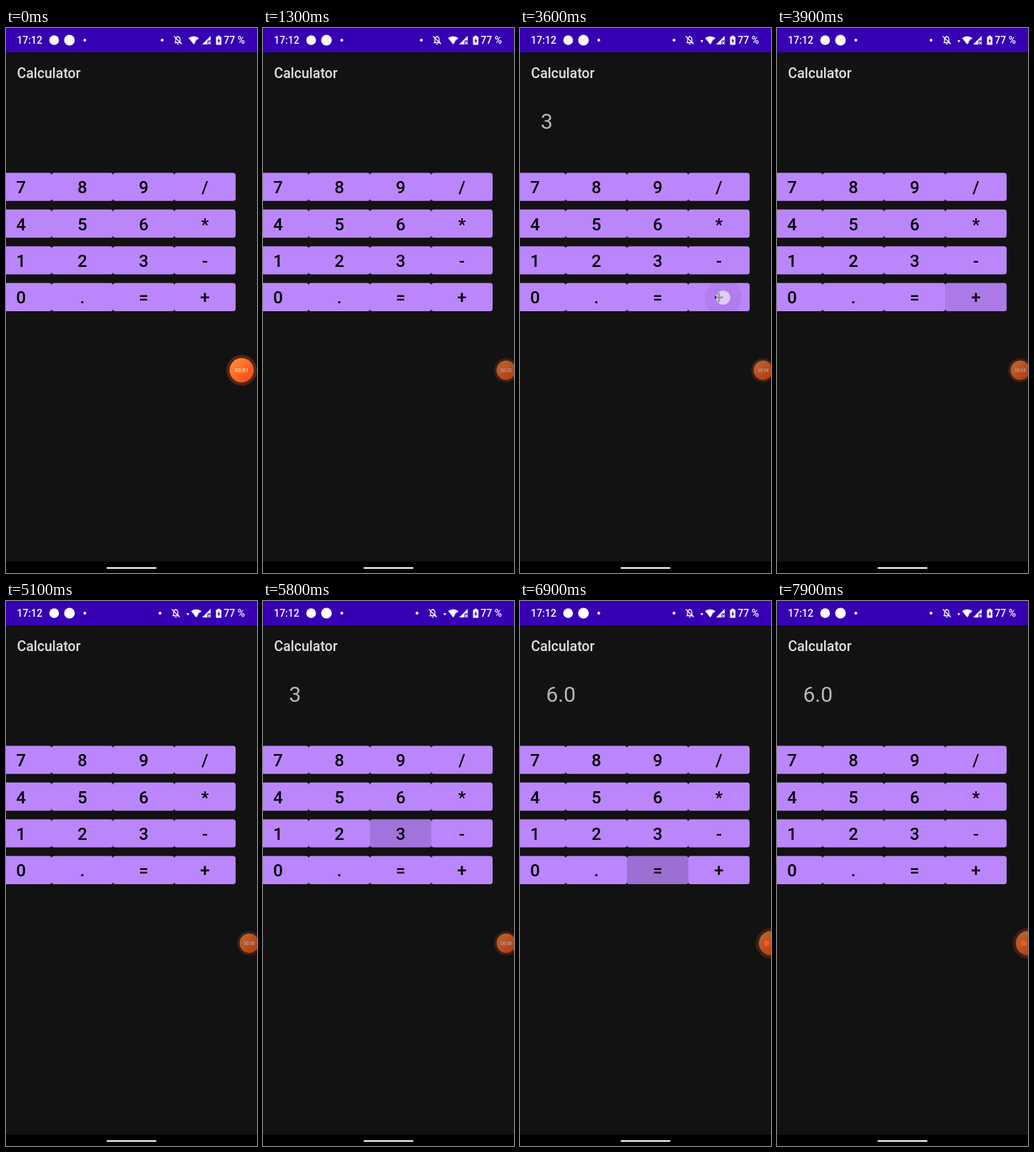
Recreate the animation shown at these times as an HTML page. Size 352x762 px, loop 8 s.

```html
<!DOCTYPE html>
<html lang="en">
<head>
<meta charset="utf-8">
<title>Calculator</title>
<style>
  html, body { margin: 0; width: 100%; height: 100%; overflow: hidden; background: #121212; }
  svg { display: block; width: 100%; height: 100%; font: 500 14px Roboto, sans-serif; }
  .key { font-size: 24px; text-anchor: middle; }
</style>
</head>
<body>
<svg viewBox="0 0 352 762">
  <defs>
    <linearGradient id="orange" x1="0" y1="0" x2="1" y2="1">
      <stop offset=".1" stop-color="#ff8a3c"/><stop offset=".9" stop-color="#fb4a12"/>
    </linearGradient>
    <clipPath id="clip"><rect id="clipBox" width="86" height="39.4" rx="3.5"/></clipPath>
  </defs>
  <rect width="352" height="762" fill="#121212"/>
  <rect width="352" height="34" fill="#3700b3"/>
  <rect y="746" width="352" height="16" fill="#000"/>
  <rect x="141" y="754" width="70" height="2" rx="1" fill="#fff"/>

  <g fill="#fff">
    <text x="15.3" y="22">17:12</text>
    <circle cx="67.5" cy="17" r="6.8"/>
    <circle cx="89" cy="17" r="7.5"/>
    <circle cx="110.5" cy="17" r="2"/>
    <g id="bell">
      <circle cx="219" cy="17" r="2"/>
      <path d="M236.5 20.5h9.5M238 20v-4q0-3.6 3-3.6t3 3.6v4M235.5 11.5l11 11" fill="none" stroke="#fff" stroke-width="1.3"/>
      <path d="M239.8 22h2.6a1.3 1.3 0 0 1-2.6 0zM240.2 11h1.6v2h-1.6z"/>
    </g>
    <path id="arrow" d="M253 17h4l-2 3.5z"/>
    <g id="wifi">
      <path d="M256 14q7-5 14.5 0l-7.2 9z"/>
      <text x="265" y="21" font-size="7" fill="#3700b3">4</text>
    </g>
    <path d="M275 23l12-12v6.5h-4.5V23z"/>
    <path d="M283.5 19l3.6 3.8m0-3.8l-3.6 3.8" stroke="#fff" stroke-width="1.1"/>
    <path d="M294.5 12.3h2v-1.5h3.6v1.5h2V23.5h-7.6z"/>
    <path d="M298.9 14l-2.6 4.4h1.7v3.4l2.5-4.5h-1.6z" fill="#3700b3"/>
    <text x="335" y="22" text-anchor="end">77 %</text>
  </g>

  <text x="15.5" y="69.5" font-size="19.5" fill="#e2e0e0">Calculator</text>
  <text id="display" y="141" font-size="30" font-weight="400" fill="#b8b8b8"/>
  <g id="keys"/>
  <g clip-path="url(#clip)"><circle id="ripple"/></g>
  <g id="labels"/>
  <circle id="touch" r="10" fill="#fff"/>

  <g id="recorder">
    <circle r="21.3" fill="#ff5a28" fill-opacity=".27"/>
    <circle r="17" fill="url(#orange)"/>
    <text id="clock" y="2.8" font-size="8" font-weight="400" text-anchor="middle" fill="#fff"/>
  </g>
  <circle id="dot" cx="346" cy="478.5" r="4" fill="#ff5426"/>
</svg>
<script>
const $ = id => document.getElementById(id);
const set = (el, attrs) => { for (const k in attrs) el.setAttribute(k, attrs[k]); };
const add = (parent, tag, attrs, text = '') => {
  const el = document.createElementNS('http://www.w3.org/2000/svg', tag);
  set(el, attrs);
  el.textContent = text;
  $(parent).append(el);
};
const ramp = (t, from, to) => Math.min(1, Math.max(0, (t - from) / (to - from)));
const mix = (a, b, k) => a + (b - a) * k;
const ease = k => k * k * (3 - 2 * k);

const LOOP = 8000, STEP = 100, KEYS = '789/456*123-0.=+';
const keyX = i => -22 + 86 * (i % 4);
const keyY = i => 202.4 + 51.4 * Math.floor(i / 4);

[...KEYS].forEach((c, i) => {
  const x = keyX(i), y = keyY(i), box = { x, width: 86, height: 39.4, rx: 3.5 };
  add('keys', 'rect', { ...box, y: y + 1, fill: '#000', opacity: .35 });
  add('keys', 'rect', { ...box, y, fill: '#bb86fc' });
  add('labels', 'text', { x: x + 43, y: y + 28.7, class: 'key' }, c);
});

// start, key, touch point, ripple length, text shown afterwards and its x
const presses = [
  { at: 2500, key: '3', x: 199, y: 324, len: 800, text: '3', left: 29 },
  { at: 3600, key: '+', x: 285, y: 377, len: 400, text: '', left: 29 },
  { at: 5600, key: '3', x: 199, y: 324, len: 800, text: '3', left: 36.4 },
  { at: 6600, key: '=', x: 195, y: 381, len: 600, text: '6.0', left: 36.4 }
];
const ticks = [1100, 2100, 3100, 4000, 5100, 6100];

function drawPress(t) {
  const shown = presses.filter(p => t >= p.at + 200).pop();
  $('display').textContent = shown ? shown.text : '';
  if (shown) set($('display'), { x: shown.left });

  const p = presses.find(p => t >= p.at && t < p.at + p.len);
  set($('ripple'), { opacity: 0 });
  set($('touch'), { opacity: 0 });
  if (!p) return;
  const age = t - p.at, i = KEYS.indexOf(p.key), peak = Math.min(300, p.len / 2);
  set($('clipBox'), { x: keyX(i), y: keyY(i) });
  set($('ripple'), {
    cx: p.x, cy: p.y, r: mix(26, 90, ramp(age, 0, peak)),
    opacity: mix(.06, .17, ramp(age, 0, peak)) * (1 - ramp(age, peak, p.len))
  });
  set($('touch'), { cx: p.x, cy: p.y, opacity: age < 200 ? .6 : 0 });
}

function drawRecorder(t) {
  const shrink = ease(ramp(t, 700, 1300)), dock = ease(ramp(t, 5800, 6300));
  const x = mix(mix(330.5, 341, shrink), 352, dock);
  const size = mix(mix(1, .79, shrink), 1, dock);
  set($('recorder'), { transform: `translate(${x} 478.5) scale(${size})`, opacity: mix(1, .7, shrink) });
  $('clock').textContent = dock > .5 ? '' : '00:0' + (1 + ticks.filter(k => t >= k).length);
  set($('dot'), { opacity: dock > .5 ? 1 : 0 });
}

function drawStatus(t) {
  const late = t >= 3100;
  set($('bell'), { transform: `translate(${late ? -3 : t >= 100 ? 3 : 0})` });
  set($('wifi'), { transform: `translate(${t >= 100 ? 3.5 : 0})` });
  set($('arrow'), { opacity: late ? 1 : 0 });
}

function frame() {
  const t = Math.floor(performance.now() % LOOP / STEP) * STEP;
  drawStatus(t);
  drawPress(t);
  drawRecorder(t);
  requestAnimationFrame(frame);
}
frame();
</script>
</body>
</html>
```
